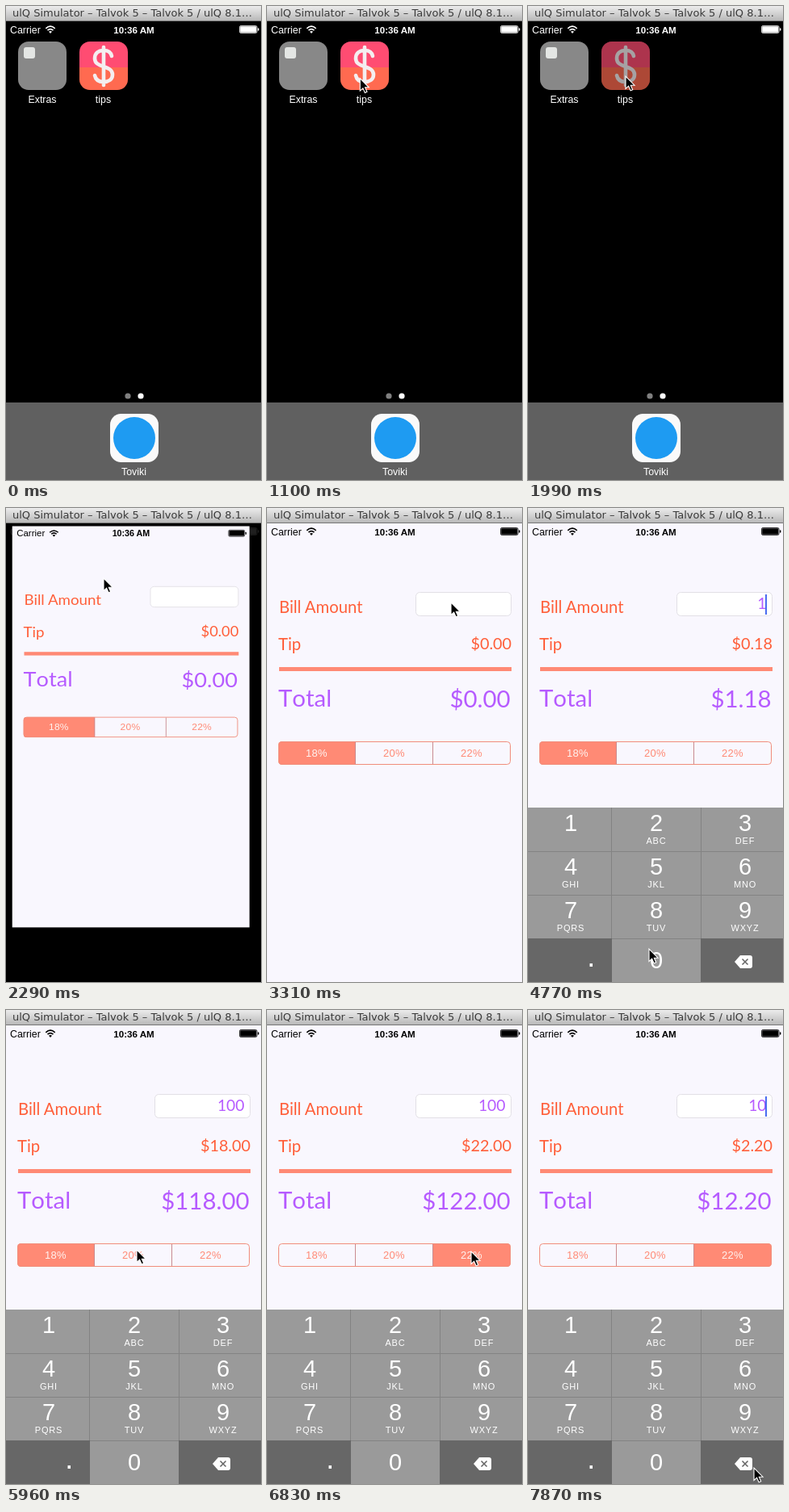
These frames come from a looping animation (316 px wide and 587 px high, 8 s). An HTML page:

```html
<!DOCTYPE html>
<html lang="en">
<head>
<meta charset="utf-8">
<title>Tip calculator</title>
<style>
  html, body { margin: 0; width: 100%; height: 100%; overflow: hidden; background: #000; }
  svg { display: block; width: 316px; height: 587px; }
  text { font-family: "Liberation Sans", Arial, sans-serif; font-size: 12.4px; }
  .mid { text-anchor: middle; }
  .end { text-anchor: end; }
  .title { font: 13px "DejaVu Sans", sans-serif; fill: #3a3a3a; }
  .clock { font-size: 11.6px; font-weight: bold; }
  .label { fill: #fff; }
  .body { font: 20.3px Lato, sans-serif; fill: #ff5f3a; }
  .tip { font-size: 19.8px; }
  .sum { font: 29.4px Lato, sans-serif; font-kerning: none; fill: #b65bff; }
  .entry { font: 19.3px Lato, sans-serif; fill: #b65bff; }
  .rate { font-size: 13px; letter-spacing: .3px; }
  .digit { font-size: 29px; fill: #fff; }
  .letters { font-size: 11px; letter-spacing: .8px; fill: #fff; }
</style>
</head>
<body>
<svg id="stage" viewBox="0 0 316 587"></svg>
<script>
const LOOP = 8000, START = 500, TICK = 147.4;
const stage = document.getElementById('stage');

// Steps are counted in ticks after START.
const cursorPath = [
  [0, 66, 138], [5, 121, 84], [6, 121, 87], [15, 121, 87], [19, 228, 117], [23, 228, 117],
  [26, 50, 392], [27, 50, 392], [29, 150, 546], [33, 150, 549], [37, 162, 297],
  [39, 162, 297], [42, 253, 299], [44, 253, 299], [47, 266, 538], [49, 280, 567]
];
const entries = [[-1, ''], [27, '1'], [30, '10'], [32, '100'], [49, '10']];
const rates = [[-1, 0], [38, 1], [43, 2]];
const percents = [18, 20, 22];

const mix = (a, b, p) => a + (b - a) * p;
const smooth = p => p * p * (3 - 2 * p);
const valueAt = (table, tick) => table.filter(row => row[0] <= tick).pop()[1];
const text = (cls, x, y, content, extra = '') =>
  `<text class="${cls}" x="${x}" y="${y}" ${extra}>${content}</text>`;
const rect = (x, y, w, h, fill, extra = '') =>
  `<rect x="${x}" y="${y}" width="${w}" height="${h}" fill="${fill}" ${extra}/>`;

function statusBar(color) {
  return `<g fill="${color}">
    ${text('', 5, 33.5, 'Carrier')}
    ${text('clock mid', 158.5, 33.5, '10:36 AM')}
    <g fill="none" stroke="${color}" stroke-width="1.7">
      <path d="M49.3 27.8Q55 22.6 60.7 27.8M51.5 30.2Q55 27 58.5 30.2"/></g>
    <path d="M53 31.8Q55 30 57 31.8L55 34Z"/>
    ${rect(289.5, 24.5, 21.5, 9, 'none', `rx="1.6" stroke="${color}" stroke-width=".8"`)}
    ${rect(290.2, 25.2, 20.1, 7.6, color, 'rx=".6"')}
    ${rect(312, 27.2, 1.4, 3.6, color, 'rx=".7"')}</g>`;
}

function homeScreen() {
  return `<g id="home">
    ${rect(15, 44, 60, 60, '#888', 'rx="13"')}
    ${rect(22, 51, 14, 14, '#e4e6e4', 'rx="3"')}
    ${text('label mid', 45, 120, 'Extras')}
    <g clip-path="url(#tile)">
      ${rect(91, 44, 60, 33, '#ff4c72')}${rect(91, 76, 60, 28, '#ff6a50')}
      <path d="M131 62C130 57 126 55 121 55C114 55 110 59 110 65C110 71 115 73 121 75
        C127 77 132 79 132 85C132 91 127 94 121 94C115 94 111 91 110 86M121 51V98"
        fill="none" stroke="#f4eef0" stroke-width="4.6" stroke-linecap="round"/>
      <rect id="press" x="91" y="44" width="60" height="60" opacity=".32"/>
    </g>
    ${text('label mid', 120.5, 120, 'tips')}
    <circle cx="151" cy="483" r="3.6" fill="#808080"/><circle cx="167" cy="483" r="3.6" fill="#fff"/>
    ${rect(0, 491, 316, 96, '#606060')}
    ${rect(129, 505, 60, 60, '#fafafa', 'rx="13.5"')}
    <circle cx="159" cy="535" r="26" fill="#1e9bf2"/>
    ${text('label mid', 158.5, 581, 'Toviki')}</g>`;
}

function keypad() {
  const centers = [53, 159, 269];
  const letters = ['', 'ABC', 'DEF', 'GHI', 'JKL', 'MNO', 'PQRS', 'TUV', 'WXYZ'];
  const keys = letters.map((word, i) => {
    const x = centers[i % 3], y = 400 + 54 * Math.floor(i / 3);
    return text('digit mid', x, y, i + 1) + text('letters mid', x, y + 16, word);
  }).join('');
  return `<g id="keypad">
    ${rect(0, 371, 316, 216, '#9a9a9a')}
    <path d="M0 425.5H316M0 479.5H316M0 533.5H316M103.5 371V587M214.5 371V587" stroke="#838383"/>
    ${rect(0, 533, 104, 54, '#676767')}${rect(214, 533, 102, 54, '#676767')}
    ${keys}${text('digit mid', 159, 570, 0)}
    ${rect(76.5, 564, 3.5, 4, '#fff')}
    <path d="M263 554H275Q278 554 278 557V567Q278 570 275 570H263L256 562Z" fill="#fff"/>
    <path d="M265.5 558.5L272.5 565.5M272.5 558.5L265.5 565.5" stroke="#676767" stroke-width="1.6"/></g>`;
}

function appScreen() {
  const segments = percents.map((percent, i) =>
    rect(14 + 96 * i, 289, 96, 29, '#ff8a75', 'class="fill"') +
    text('rate mid', 61.5 + 96 * i, 308, percent + '%')).join('');
  return `<g id="app">
    ${rect(-1, 19, 318.5, 568, '#f9f7fe')}${statusBar('#000')}
    ${text('body', 15, 130, 'Bill Amount')}
    ${rect(184.5, 104.5, 118, 29, '#fff', 'rx="5" stroke="#e2e0e6"')}
    ${text('entry end', 295.5, 125, '', 'id="entry"')}
    ${rect(294, 107, 2, 25, '#4a6cf0', 'id="caret"')}
    ${text('body', 14, 176, 'Tip')}${text('body tip end', 303, 175, '', 'id="tip"')}
    ${rect(15, 197, 288, 5, '#ff8a75')}
    ${text('sum', 14, 246, 'Total')}${text('sum end', 301.5, 247, '', 'id="total"')}
    <g clip-path="url(#segments)">${segments}</g>
    ${rect(14.5, 289.5, 287, 28, 'none', 'rx="4" stroke="#f08d7b"')}
    <path d="M109.5 290V317M205.5 290V317" stroke="#c98c90"/>
    ${keypad()}</g>`;
}

stage.innerHTML = `<defs>
    <linearGradient id="metal" x2="0" y2="1"><stop stop-color="#ececec"/><stop offset="1" stop-color="#b6b6b6"/></linearGradient>
    <clipPath id="tile">${rect(91, 44, 60, 60, '#000', 'rx="13"')}</clipPath>
    <clipPath id="segments">${rect(14, 289, 288, 29, '#000', 'rx="4.5"')}</clipPath>
  </defs>
  ${rect(0, 0, 316, 587, '#000')}
  ${homeScreen()}<g id="homeStatus">${statusBar('#fff')}</g>${appScreen()}
  ${rect(0, 0, 316, 19, 'url(#metal)')}${rect(0, 18, 316, 1, '#777')}
  ${text('title', 8, 12.5, 'ulQ Simulator – Talvok 5 – Talvok 5 / ulQ 8.1…')}
  <path id="cursor" d="M0 0V15.5L3.6 12.2L6.1 17.8L8.7 16.7L6.3 11.2H11Z" stroke="#fff" stroke-width="1.1"/>`;

const el = Object.fromEntries([...stage.querySelectorAll('[id]')].map(node => [node.id, node]));
const fills = [...stage.querySelectorAll('.fill')];
const rateLabels = [...stage.querySelectorAll('.rate')];
const show = (node, on) => node.setAttribute('visibility', on ? 'visible' : 'hidden');

function cursorAt(tick) {
  const next = cursorPath.findIndex(row => row[0] > tick);
  if (next < 1) return cursorPath[cursorPath.length - 1].slice(1);
  const [t0, x0, y0] = cursorPath[next - 1], [t1, x1, y1] = cursorPath[next];
  const p = smooth((tick - t0) / (t1 - t0));
  return [mix(x0, x1, p), mix(y0, y1, p)];
}

// The app grows out of its icon while the home screen zooms with it.
function drawLaunch(tick) {
  const [px, py] = tick < 11 ? [0, 0] : tick === 11 ? [.38, .34] : tick === 12 ? [.905, .86] : [1, 1];
  const left = mix(91, 0, px), right = mix(151, 316, px);
  const top = mix(44, 19, py), bottom = mix(104, 587, py);
  const zoom = (right - left) / 60;
  el.app.setAttribute('transform',
    `translate(${left} ${top}) scale(${(right - left) / 316} ${(bottom - top) / 568}) translate(0 -19)`);
  el.app.setAttribute('opacity', tick < 11 ? 0 : tick === 11 ? .85 : 1);
  el.home.setAttribute('transform',
    `translate(${(left + right) / 2} ${(top + bottom) / 2}) scale(${zoom}) translate(-121 -74)`);
  el.home.setAttribute('opacity', tick === 11 ? .6 : tick === 12 ? 0 : 1);
  el.homeStatus.setAttribute('opacity', tick < 11 ? 1 : tick === 11 ? .6 : .12);
  show(el.press, tick === 10 || tick === 11);
}

function drawBill(tick, time) {
  const entry = valueAt(entries, tick), rate = valueAt(rates, tick);
  const bill = Number(entry), tip = bill * percents[rate] / 100;
  el.entry.textContent = entry;
  el.tip.textContent = '$' + tip.toFixed(2);
  el.total.textContent = '$' + (bill + tip).toFixed(2);
  fills.forEach((node, i) => node.setAttribute('opacity', i === rate ? 1 : 0));
  rateLabels.forEach((node, i) => node.setAttribute('fill', i === rate ? '#fff3f0' : '#ff8a75'));
  const steady = time < 5200 || time > 7700;
  show(el.caret, tick >= 21 && (steady || (time - 5200) % 1000 < 500));
  const rise = tick < 21 ? 0 : tick === 21 ? .5 : tick === 22 ? .92 : 1;
  show(el.keypad, rise > 0);
  el.keypad.setAttribute('transform', `translate(0 ${216 * (1 - rise)})`);
}

function draw(time) {
  const tick = time < START ? -1 : Math.floor((time - START + 15) / TICK);
  drawLaunch(tick);
  drawBill(tick, time);
  show(el.cursor, tick >= 0);
  if (tick >= 0) el.cursor.setAttribute('transform', `translate(${cursorAt(tick)})`);
}

const begin = performance.now();
function loop() {
  draw((performance.now() - begin) % LOOP);
  requestAnimationFrame(loop);
}
loop();
</script>
</body>
</html>
```
